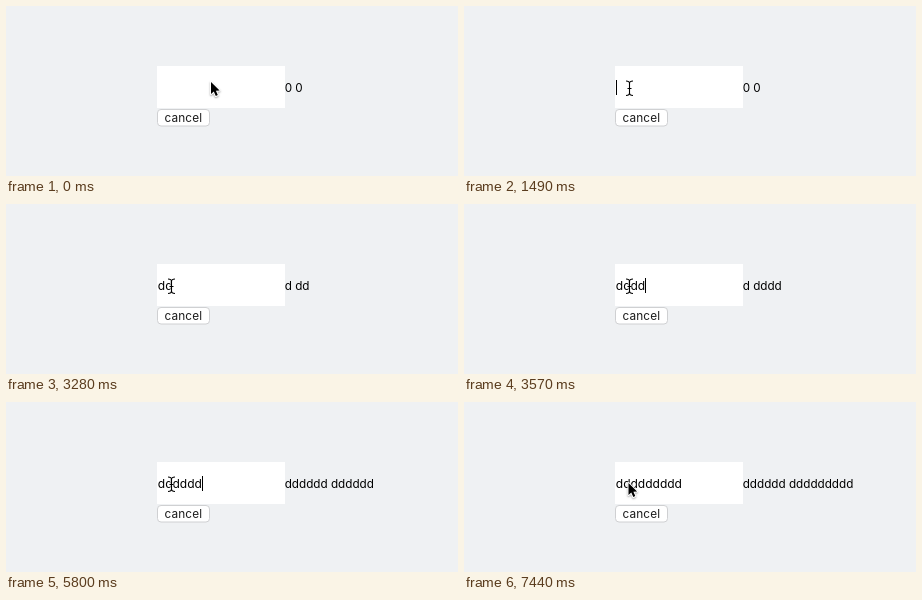
Animation, 452 px wide and 170 px high, one loop 8000 ms. Source, as an HTML page with a canvas:

```html
<!DOCTYPE html>
<html lang="en">
<head>
<meta charset="utf-8">
<title>Input demo</title>
<style>
html, body { margin: 0; width: 100%; height: 100%; overflow: hidden; background: #eff1f3; }
canvas { display: block; }
</style>
</head>
<body>
<canvas id="stage" width="452" height="170"></canvas>
<script>
const ctx = document.getElementById('stage').getContext('2d');
const LOOP = 8000;
const FONT = 'Inter, Roboto, sans-serif';
const ADVANCE = 7.36;

// Each row: start time, values that change from then on.
const steps = [
  [0, { typed: 0, echoed: 0, caret: false, pointer: 'arrow', x: 205, y: 76 }],
  [300, { x: 204, y: 76 }],
  [450, { x: 194, y: 79 }],
  [750, { x: 194, y: 78 }],
  [1350, { pointer: 'beam', x: 169.5, y: 82 }],
  [1490, { x: 165.5, caret: true }],
  [1940, { caret: false }],
  [2390, { typed: 1, echoed: 1, caret: true }],
  [2990, { caret: false }],
  [3280, { typed: 2 }],
  [3430, { typed: 3, caret: true }],
  [3570, { typed: 4 }],
  [3720, { typed: 5 }],
  [4160, { caret: false }],
  [4760, { caret: true }],
  [5210, { caret: false }],
  [5660, { caret: true }],
  [5800, { typed: 6, echoed: 6 }],
  [5950, { typed: 7, pointer: 'arrow', x: 164.5, y: 81 }],
  [6550, { typed: 8 }],
  [7000, { typed: 9 }],
  [7440, { caret: false }]
];

function stateAt(time) {
  const state = {};
  for (const [start, change] of steps) {
    if (start <= time) Object.assign(state, change);
  }
  return state;
}

function label(text, x, y, size, spacing = '0px', color = '#000') {
  ctx.font = `${size}px ${FONT}`;
  ctx.letterSpacing = spacing;
  ctx.fillStyle = color;
  ctx.fillText(text, x, y);
}

function drawButton() {
  ctx.beginPath();
  ctx.roundRect(151.5, 103.5, 52, 16.5, 3.5);
  ctx.fillStyle = '#fff';
  ctx.fill();
  ctx.lineWidth = 1;
  ctx.strokeStyle = '#cfd0d2';
  ctx.stroke();
  label('cancel', 158.6, 116, 11.8, '0.1px', '#1c1c1c');
}

function drawArrow(x, y) {
  const points = [[0, 0], [0, 12], [2.8, 9.4], [4.8, 14], [6.8, 13.1], [4.9, 8.7], [8.6, 8.6]];
  ctx.save();
  ctx.translate(x, y);
  ctx.beginPath();
  points.forEach(([px, py]) => ctx.lineTo(px, py));
  ctx.closePath();
  ctx.lineWidth = 2;
  ctx.lineJoin = 'round';
  ctx.strokeStyle = '#fff';
  ctx.shadowColor = 'rgba(0,0,0,0.35)';
  ctx.shadowBlur = 2;
  ctx.shadowOffsetY = 1;
  ctx.stroke();
  ctx.shadowColor = 'transparent';
  ctx.fillStyle = '#000';
  ctx.fill();
  ctx.restore();
}

function drawBeam(x, y) {
  ctx.save();
  ctx.translate(x, y);
  ctx.beginPath();
  for (const side of [-1, 1]) {
    ctx.moveTo(side * 3.5, -7);
    ctx.quadraticCurveTo(0, -7, 0, -4.5);
    ctx.lineTo(0, 5);
    ctx.quadraticCurveTo(0, 7.5, side * 3.5, 7.5);
  }
  ctx.moveTo(-2, 2.5 - 2);
  ctx.lineTo(2, 2.5 - 2);
  for (const [width, color] of [[2.4, 'rgba(255,255,255,0.8)'], [1.1, '#000']]) {
    ctx.lineWidth = width;
    ctx.strokeStyle = color;
    ctx.stroke();
  }
  ctx.restore();
}

function draw(time) {
  const s = stateAt(time);
  ctx.fillStyle = '#eff1f3';
  ctx.fillRect(0, 0, 452, 170);
  ctx.fillStyle = '#fff';
  ctx.fillRect(151, 60, 128, 42);
  drawButton();

  const word = n => 'd'.repeat(n);
  label(word(s.typed), 151.8, 86, 12);
  const echo = s.typed ? `${word(s.echoed)} ${word(s.typed)}` : '0 0';
  label(echo, 278.7, 85.5, 11.7);

  if (s.caret) {
    ctx.fillStyle = '#000';
    ctx.fillRect(Math.round(152 + s.typed * ADVANCE), 74, 1, 15);
  }
  (s.pointer === 'arrow' ? drawArrow : drawBeam)(s.x, s.y);
}

function tick() {
  draw(performance.now() % LOOP);
  requestAnimationFrame(tick);
}
tick();
</script>
</body>
</html>
```
